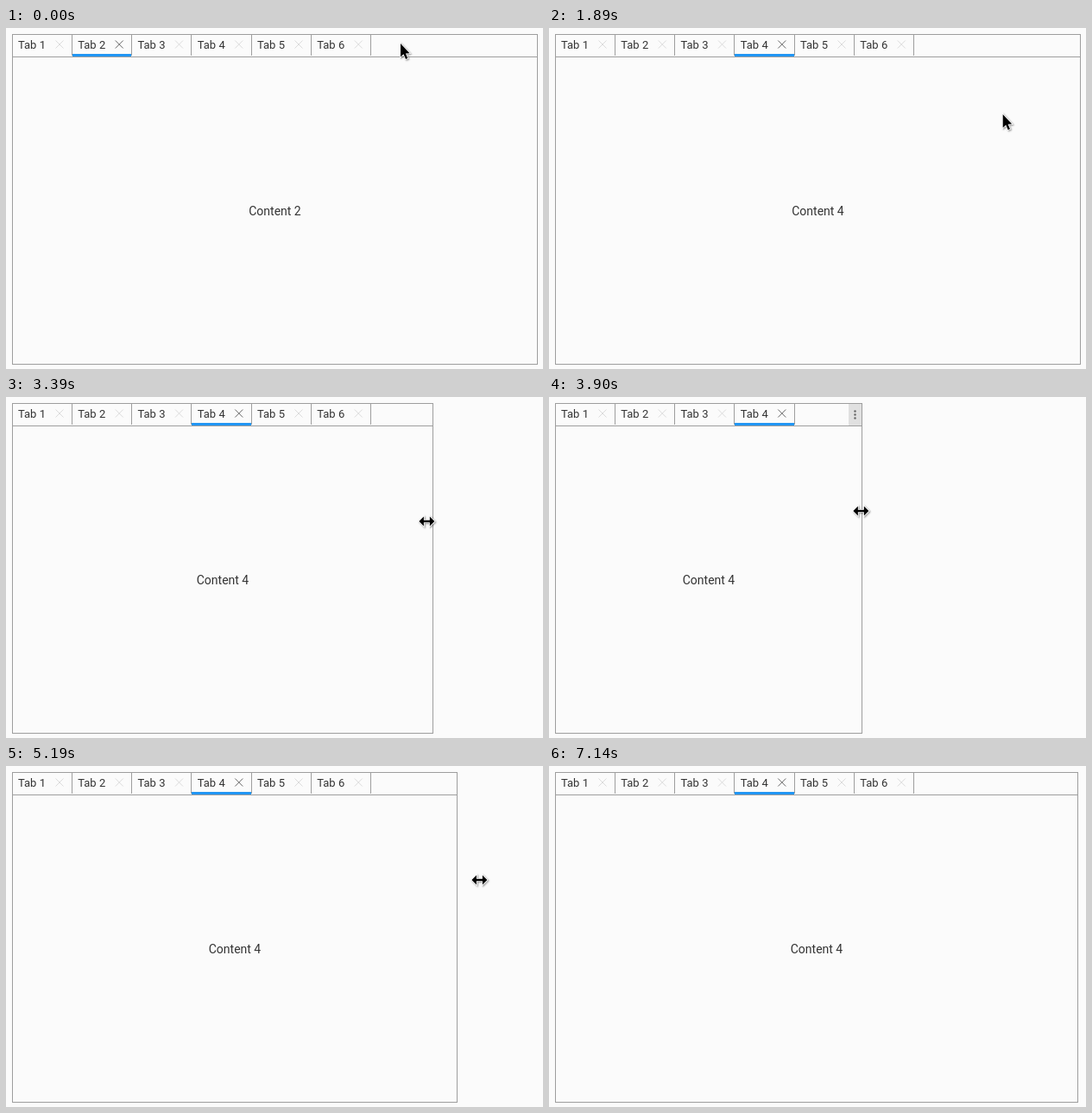
An HTML page with a canvas for the animation above (7.38 s loop, 622 by 395 pixels).

```html
<!DOCTYPE html>
<html lang="en">
<head>
<meta charset="utf-8">
<title>Resizable tabs</title>
<style>
html, body { margin: 0; width: 100%; height: 100%; overflow: hidden; background: #fbfbfb; }
canvas { display: block; }
</style>
</head>
<body>
<canvas id="stage" width="622" height="395"></canvas>
<script>
const g = document.getElementById('stage').getContext('2d');
const LOOP = 7380, STEP = 30, LEFT = 7, PITCH = 69.25, TABS = 6, MENU = 16;
const BACK = '#fbfbfb', LINE = '#9e9e9e', INK = '#333', BLUE = '#2196f3', HOVER = '#e6e6e6';

const linear = u => u;
const easeIn = p => u => u ** p;
const easeOut = p => u => 1 - (1 - u) ** p;

// A value over time; each move is [begin, end, destination, ease]
const track = (start, ...moves) => t => moves.reduce((value, [begin, end, dest, ease = linear]) => {
  const u = Math.min(1, Math.max(0, (t - begin) / (end - begin)));
  return value + (dest - value) * ease(u);
}, start);

const pointerX = track(457,
  [30, 1020, 246, easeOut(1.1)],
  [1380, 2130, 592, easeOut(1.45)],
  [2130, 2460, 616, easeOut(2)],
  [3060, 4200, 336, easeOut(1.8)],
  [4530, 5250, 578, easeIn(1.5)],
  [5280, 5970, 618]);
const pointerY = track(18,
  [1380, 2130, 118, easeOut(1.5)],
  [2130, 2460, 144, easeOut(2)],
  [3390, 3900, 132],
  [5190, 5850, 141]);
const rightEdge = track(616,
  [3090, 4200, 336, easeOut(1.8)],
  [4530, 5280, 566, easeIn(1.6)],
  [5280, 5970, 615],
  [6030, 6060, 613]);

function rect(x, y, w, h, color) {
  g.fillStyle = color;
  g.fillRect(x, y, w, h);
}

function label(text, x, y, size, align) {
  g.font = `${size}px Roboto, sans-serif`;
  g.textAlign = align;
  g.fillStyle = INK;
  g.fillText(text, x, y);
}

function cross(x, y, color) {
  g.strokeStyle = color;
  g.lineWidth = 1;
  g.beginPath();
  for (const s of [-1, 1]) {
    g.moveTo(x - 4.5, y - 4.5 * s);
    g.lineTo(x + 4.5, y + 4.5 * s);
  }
  g.stroke();
}

function cursor(x, y, outline) {
  const path = new Path2D(outline);
  g.save();
  g.translate(x, y);
  g.shadowColor = 'rgba(0,0,0,.45)';
  g.shadowBlur = 2;
  g.shadowOffsetX = g.shadowOffsetY = 1;
  g.strokeStyle = '#fff';
  g.lineWidth = 1.6;
  g.stroke(path);
  g.shadowColor = 'transparent';
  g.fillStyle = '#000';
  g.fill(path);
  g.restore();
}

const ARROW = 'M0 0V15.5L3.5 12.3L6 18L8.3 17L5.9 11.5L10.5 11.3Z';
const RESIZER = 'M-9 0L-3.5 -5.5V-1.3H3.5V-5.5L9 0L3.5 5.5V1.3H-3.5V5.5Z';

function drawMenu(right) {
  rect(right - MENU, 8, MENU, 25, '#e0e0e0');
  g.fillStyle = '#666';
  for (let y = 16.5; y < 26; y += 4) {
    g.beginPath();
    g.arc(right - 8.5, y, 1.2, 0, 7);
    g.fill();
  }
}

function drawTabs(right, selected, hovered) {
  const crowded = right < LEFT + TABS * PITCH;
  const room = crowded ? right - MENU : right;
  for (let i = 0; i < TABS; i++) {
    const x = LEFT + i * PITCH, start = Math.floor(x) + 1, end = Math.floor(x + PITCH);
    if (end > room) break;
    const active = i === selected;
    label(`Tab ${i + 1}`, x + 7, 24, 13, 'left');
    cross(x + 55, 19, active ? '#666' : '#dcdcdc');
    rect(end, 8, 1, 24, LINE);
    if (active || i === hovered) rect(start, 30, end - start, 3, active ? BLUE : HOVER);
  }
  if (crowded) drawMenu(right);
}

function draw(t) {
  const x = pointerX(t), y = pointerY(t), right = Math.round(rightEdge(t));
  const selected = t < 1230 ? 1 : 3;
  const hovered = y < 33 ? Math.floor((x - LEFT) / PITCH) : -1;

  rect(0, 0, 622, 395, BACK);
  drawTabs(right, selected, hovered);
  rect(LEFT, 33, right - LEFT, 1, LINE);
  g.strokeStyle = LINE;
  g.lineWidth = 1;
  g.strokeRect(LEFT + 0.5, 7.5, right - LEFT - 1, 382);
  label(`Content ${selected + 1}`, (right + LEFT) / 2, 217, 14, 'center');

  if (t < 6300) cursor(x, y, t < 2610 ? ARROW : RESIZER);
}

function tick(now) {
  draw(Math.floor(now % LOOP / STEP) * STEP);
  requestAnimationFrame(tick);
}
requestAnimationFrame(tick);
</script>
</body>
</html>
```
